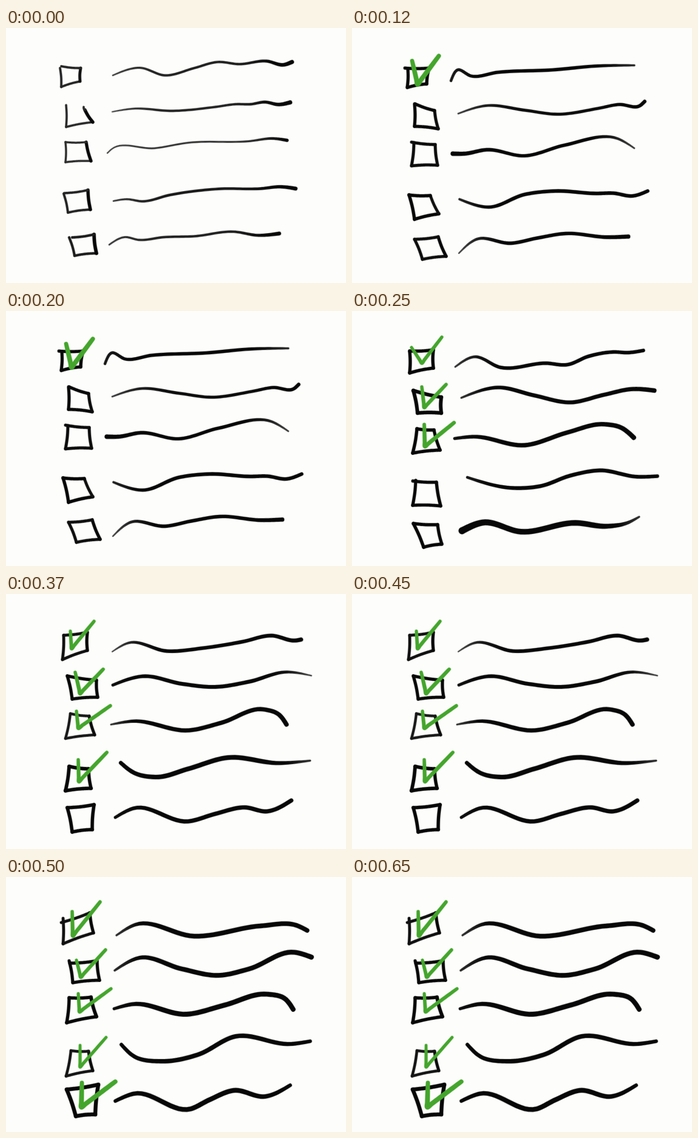
These frames come from a looping animation (560x420 px, 0.75 s). An HTML page:

```html
<!DOCTYPE html>
<html lang="en">
<head>
<meta charset="utf-8">
<title>Checklist</title>
<style>
html, body { margin: 0; width: 100%; height: 100%; overflow: hidden; background: #fdfdfb; }
svg { display: block; width: 560px; height: 420px; }
</style>
</head>
<body>
<svg id="stage" viewBox="0 0 560 420"></svg>
<script>
const stage = document.getElementById("stage");
const GREEN = "#44a52c";
const LOOP = 750;
const starts = [0, 120, 250, 370, 500];
let layer, gradients = 0;

function add(parent, name, attrs = {}) {
  const el = document.createElementNS("http://www.w3.org/2000/svg", name);
  for (const key in attrs) el.setAttribute(key, attrs[key]);
  parent.append(el);
  return el;
}

const dist = (a, b) => Math.hypot(b[0] - a[0], b[1] - a[1]);
const mix = (a, b, t) => [a[0] + (b[0] - a[0]) * t, a[1] + (b[1] - a[1]) * t];
const pairs = flat => flat.flatMap((v, i) => i % 2 ? [] : [[v, flat[i + 1]]]);

// Light pressure leaves thin, grey ink
function ink(w) {
  const v = Math.round(Math.min(85, Math.max(8, 105 - 20 * w)));
  return `rgb(${v},${v},${v})`;
}

// Pen pressure: eases from the start into the belly, then out to the end
function pressure([start, belly, end], f) {
  const lead = Math.max(0, 1 - 3 * f) ** 2, trail = Math.max(0, 3 * f - 2) ** 2;
  return belly + (start - belly) * lead + (end - belly) * trail;
}

// Smooth curve through key points, with slopes weighted by spacing
function curve(pts, steps = 14) {
  const n = pts.length - 1;
  const gap = pts.slice(1).map((p, i) => dist(pts[i], p));
  const rise = gap.map((g, i) => [0, 1].map(k => (pts[i + 1][k] - pts[i][k]) / g));
  const slope = pts.map((p, i) => i && i < n ? mix(rise[i - 1], rise[i], gap[i - 1] / (gap[i - 1] + gap[i])) : rise[0]);
  const ending = (r, m) => mix(m, r, 1.5);
  if (n > 1) {
    slope[0] = ending(rise[0], slope[1]);
    slope[n] = ending(rise[n - 1], slope[n - 1]);
  }
  const out = [pts[0]];
  for (let i = 0; i < n; i++) {
    for (let s = 1; s <= steps; s++) {
      const t = s / steps, u = 1 - t;
      out.push([0, 1].map(k =>
        u * u * (1 + 2 * t) * pts[i][k] + t * t * (3 - 2 * t) * pts[i + 1][k] +
        t * u * gap[i] * (u * slope[i][k] - t * slope[i + 1][k])));
    }
  }
  return out;
}

// Soft-edged outline around the curve
function brush(widths, pts, color) {
  const path = curve(pts), last = path.length - 1;
  const run = [0];
  for (let i = 1; i <= last; i++) run.push(run[i - 1] + dist(path[i - 1], path[i]));
  const left = [], right = [];
  path.forEach((p, i) => {
    const a = path[Math.max(i - 1, 0)], b = path[Math.min(i + 1, last)];
    const k = pressure(widths, run[i] / run[last]) / 2 / dist(a, b);
    const nx = (a[1] - b[1]) * k, ny = (b[0] - a[0]) * k;
    left.push(`${(p[0] + nx).toFixed(2)} ${(p[1] + ny).toFixed(2)}`);
    right.unshift(`${(p[0] - nx).toFixed(2)} ${(p[1] - ny).toFixed(2)}`);
  });
  const cap = (w, to) => `A${w / 2} ${w / 2} 0 0 0 ${to}`;
  const d = "M" + left.join("L") + cap(widths[2], right[0]) +
    "L" + right.join("L") + cap(widths[0], left[0]) + "Z";
  add(layer, "path", { d, fill: color, stroke: color, "stroke-width": 1.3, "stroke-opacity": 0.35 });
}

function line(widths, ...flat) {
  const pts = pairs(flat), id = "ink" + gradients++;
  const g = add(layer, "linearGradient", {
    id, gradientUnits: "userSpaceOnUse", x1: flat[0], x2: flat[flat.length - 2], y1: 0, y2: 0
  });
  for (let f = 0; f <= 1; f += 0.125) add(g, "stop", { offset: f, "stop-color": ink(pressure(widths, f)) });
  brush(widths, pts, `url(#${id})`);
}

// Corners from top left, down and round; a fifth point leaves the box open
function box(w, heavy, ...flat) {
  const p = pairs(flat);
  if (p.length < 5) p.push(p[0]);
  for (let i = 0; i < 4; i++) {
    const a = p[i], b = p[i + 1], k = 0.9 / dist(a, b);
    const mid = mix(a, b, 0.5);
    const bowed = [mid[0] + (b[1] - a[1]) * k, mid[1] - (b[0] - a[0]) * k];
    const e = i === 2 ? heavy : w;
    brush([e, e, e], [a, bowed, b], ink(e));
  }
}

function tick(w, ...flat) {
  const [a, b, c] = pairs(flat);
  brush([w * 0.85, w, w * 0.9], [a, mix(a, b, 0.8), b, mix(b, c, 0.13), c], GREEN);
}

const scenes = [
  () => {
    line([2, 3.6, 6.5], 176,78, 220,65.5, 262,78, 310,66, 349,56, 384,59.5, 429,54.5, 458,60.5, 471,56);
    line([1.6, 3.5, 6.5], 175,138, 208,133, 275,136.5, 345,130, 378,125.5, 403,125.5, 426,122, 450,126, 468,122.5);
    line([1.8, 2.6, 5], 167,206, 174,199.5, 245,198, 300,189, 400,186.5, 440,182, 463,185);
    line([2.2, 4, 6], 177,285, 198,282, 225,285.5, 270,275, 350,265, 420,264.5, 452,261.5, 477,264.5);
    line([2.2, 3.6, 6], 170,357, 195,344.5, 219,349, 260,344.5, 310,343, 375,335.5, 416,341.5, 450,338.5);
    box(3.4, 4.4, 89,66, 91,97, 122,88, 123,66, 91,63);
    box(3.2, 5, 99,127, 99,163, 143,155, 130,135, 128,130);
    box(3, 4.8, 98,188, 98,221, 140,219, 132,188);
    box(3.5, 5, 95,273, 102,304, 139,299, 135,267, 96,272);
    box(3.8, 5.4, 104,345, 113,375, 149,371, 145,340, 109,345);
  },
  () => {
    line([4, 5.2, 3], 163,87, 174,69, 196,79, 240,73, 330,69, 405,62.5, 465,61.5);
    line([2.2, 4.6, 5.5], 175,141, 220,128, 285,135.5, 338,142, 405,132.5, 440,126, 474,128, 482,121);
    line([7, 5.2, 2.2], 166,207, 185,207, 222,200.5, 284,210.5, 350,193, 437,182, 465,198);
    line([3.5, 5.6, 5.5], 177,282, 225,295, 285,274, 335,268.5, 402,272.5, 430,272, 463,276.5, 487,268.5);
    line([1.8, 5.4, 6.5], 176,371, 205,348, 262,354.5, 305,346, 352,338.5, 420,344.5, 455,343.5);
    box(4.8, 5, 92,67, 91,98, 123,92, 127,66, 87,66);
    box(4.8, 4.6, 103,125, 103,162, 142,166, 136,136, 104,125);
    box(4.6, 4.6, 102,189, 98,227, 141,226, 137,192, 98,188);
    box(5, 4.4, 94,275, 103,315, 143,306, 129,276);
    box(4.5, 4.8, 103,348, 116,381, 155,376, 142,344);
    tick(7.4, 99,54, 108,93, 143,46);
  },
  () => {
    line([2.5, 5.5, 5.5], 170,92, 201,75.5, 245,93, 320,86, 354,88.5, 390,74.5, 430,67.5, 455,68.5, 480,65);
    line([2.8, 6.2, 7], 180,143, 240,126, 300,139, 360,150.5, 415,138, 463,128.5, 498,131);
    line([4.5, 6.8, 7.5], 169,210, 200,207, 285,221, 355,200, 415,186.5, 443,192, 464,208.5);
    line([4, 6, 5.5], 190,274, 265,291.5, 310,288.5, 360,271, 408,262.5, 470,273, 503,272);
    line([11, 8.8, 2.8], 181,362, 215,348.5, 278,363.5, 368,349, 420,354.5, 452,349.5, 473,339);
    box(5, 5, 95,66, 95,102, 134,94, 134,64);
    box(5.6, 5.6, 101,131, 108,168, 147,168, 147,142);
    box(5, 4.8, 107,194, 100,234, 145,229, 135,196);
    box(4.8, 5, 105,279, 100,320, 146,321, 139,282, 100,280);
    box(5, 4.8, 101,350, 118,389, 148,384, 141,352);
    tick(5.4, 98,60, 115,86, 148,43);
    tick(5.8, 115,125, 119,159, 155,121);
    tick(6.4, 119,187, 120,223, 168,184);
  },
  () => {
    line([1.6, 5.6, 6.5], 175,95, 202,80.5, 265,94, 325,89, 390,78.5, 437,68.5, 478,76.5, 486,75);
    line([4.5, 6, 1.8], 176,150, 225,135.5, 290,148, 345,153, 400,144.5, 463,128.5, 503,134.5);
    line([2.5, 6.6, 7], 173,215, 208,209.5, 302,224.5, 355,212, 424,190, 448,197.5, 462,215);
    line([6, 7.4, 2.8], 189,278, 212,295, 248,301.5, 300,288, 365,269.5, 450,278.5, 501,274.5);
    line([4.5, 6.6, 6.5], 180,368, 210,353, 300,374.5, 345,362, 393,351.5, 430,358, 470,340);
    box(4.4, 4.8, 95,68, 93,108, 134,93, 134,63);
    box(4.8, 4.8, 101,135, 109,173, 151,170, 149,142);
    box(4, 4.6, 106,197, 98,238, 146,232, 137,201);
    box(5.4, 5, 104,284, 98,324, 140,320, 136,288);
    box(5.2, 5.2, 101,352, 109,392, 142,388, 145,347);
    tick(5.6, 106,61, 108,90, 145,45);
    tick(6, 114,129, 122,164, 160,124);
    tick(5.8, 116,193, 119,221, 172,184);
    tick(6, 119,273, 120,309, 166,261);
  },
  () => {
    line([2.8, 7.4, 7], 182,96, 213,78.5, 310,97.5, 420,80.5, 478,79.5, 496,88);
    line([3.2, 7.4, 7.8], 179,154, 220,133, 290,151.5, 350,162, 400,151.5, 475,124, 503,132);
    line([4.5, 7.8, 7.5], 178,217, 208,209.5, 298,226, 360,211, 430,193, 458,199.5, 473,218);
    line([5.5, 7, 5.5], 190,276, 212,296, 258,303.5, 315,293, 378,262.5, 470,275, 501,270.5);
    line([5.5, 7.6, 5.5], 180,369, 210,357, 304,382, 335,367, 375,351.5, 427,361.5, 468,343);
    box(4.4, 4.8, 94,68, 94,110, 144,92, 138,59, 91,75);
    box(4.8, 4.8, 104,138, 110,174, 154,170, 150,138, 105,142);
    box(5, 5.4, 104,199, 100,240, 149,230, 140,198);
    box(4.2, 4.6, 107,286, 99,328, 143,319, 136,287);
    box(6, 6, 100,350, 115,394, 147,391, 152,342);
    tick(6, 109,57, 110,97, 155,41);
    tick(5.6, 116,137, 123,165, 164,120);
    tick(5.6, 119,192, 121,222, 173,184);
    tick(5, 122,277, 122,313, 165,264);
    tick(7.6, 125,339, 124,379, 180,337);
  }
];

const layers = scenes.map(draw => {
  layer = add(stage, "g");
  draw();
  return layer;
});

function render(time) {
  const t = time % LOOP;
  const now = starts.filter(s => s <= t).length - 1;
  layers.forEach((g, i) => g.setAttribute("visibility", i === now ? "visible" : "hidden"));
}

const begin = performance.now();
function loop() {
  render(performance.now() - begin);
  requestAnimationFrame(loop);
}
loop();
</script>
</body>
</html>
```
